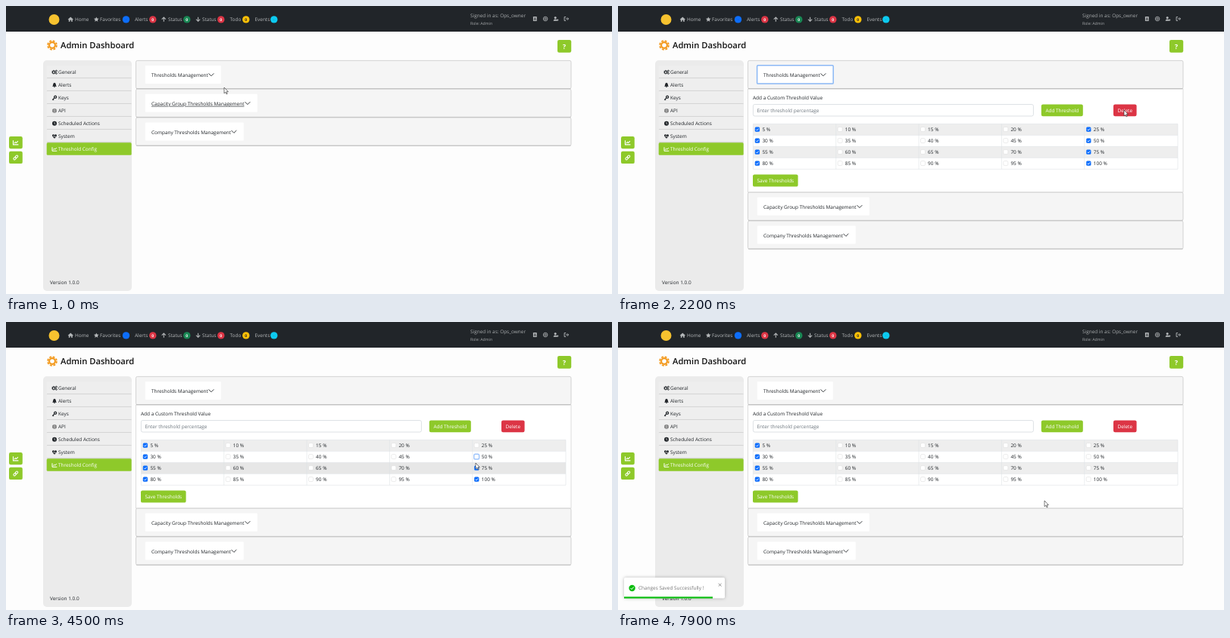
These frames come from a looping animation (800x382 px, 8 s). An HTML page:

```html
<!DOCTYPE html>
<html lang="en">
<head>
<meta charset="utf-8">
<title>Admin Dashboard</title>
<style>
html, body { margin: 0; width: 100%; height: 100%; overflow: hidden; background: #fdfdfd; }
svg { display: block; width: 800px; height: 382px; }
text { font: 6.45px "Open Sans", "Noto Sans", sans-serif; text-rendering: geometricPrecision; white-space: pre; }
</style>
</head>
<body>
<svg id="stage" viewBox="0 0 800 382"></svg>
<script>
const GREEN = '#8ec92a', RED = '#dc3545', INK = '#212529', BLUE = '#0d6efd';

const rect = (x, y, w, h, fill, more = '') =>
  `<rect x="${x}" y="${y}" width="${w}" height="${h}" fill="${fill}" ${more}/>`;
const disc = (x, y, r, fill, more = '') =>
  `<circle cx="${x}" cy="${y}" r="${r}" fill="${fill}" ${more}/>`;
const text = (x, y, s, fill = INK, style = '', more = '') =>
  `<text x="${x}" y="${y}" fill="${fill}" style="${style}" ${more}>${s}</text>`;
const centred = (x, y, s, fill, style) => text(x, y, s, fill, style, 'text-anchor="middle"');
const line = (d, stroke, w = 1, more = '') =>
  `<path d="${d}" fill="none" stroke="${stroke}" stroke-width="${w}" ${more}/>`;
const group = (id, body, more = '') => `<g id="${id}" ${more}>${body}</g>`;

// Icons are drawn around their own centre in a box of about 7 px.
const gear = c => disc(0, 0, 1.9, 'none', `stroke="${c}" stroke-width="1.3"`) +
  disc(0, 0, 2.8, 'none', `stroke="${c}" stroke-width="1" stroke-dasharray="1.1"`);
const icons = {
  home: c => `<path d="M-3.6 0L0-3.2 3.6 0 3 .6 2.5.2V3H.8V1H-.8V3H-2.5V.2L-3 .6Z" fill="${c}"/>`,
  star: c => `<path d="M0-3.3L1-1.1 3.3-.9 1.6.7 2.1 3 0 1.8-2.1 3-1.6.7-3.3-.9-1-1.1Z" fill="${c}"/>`,
  up: c => line('M0 3V-2.5M-2.6 0L0-2.6 2.6 0', c, 1.1),
  down: c => line('M0-3V2.5M-2.6 0L0 2.6 2.6 0', c, 1.1),
  book: c => rect(-2.4, -3, 4.8, 6, c, 'rx=".6"') + disc(0, -.9, .9, INK) + rect(-1.4, .5, 2.8, 1.1, INK),
  ring: c => disc(0, 0, 2.8, 'none', `stroke="${c}" stroke-width=".8"`) + disc(0, 0, 1.2, 'none', `stroke="${c}" stroke-width=".8"`),
  user: c => disc(-.7, -1.4, 1.5, c) + `<path d="M-3.3 2.8Q-3 .4-.7.4T1.9 2.8Z" fill="${c}"/>` + disc(2.3, 1.6, 1.1, c),
  exit: c => line('M-.6-2.5H-2.6V2.5H-.6M-1 0H2.8M1.2-1.7L2.9 0 1.2 1.7', c, .9),
  gears: c => `<g transform="translate(-1 0) scale(.85)">${gear(c)}</g>` + disc(2.5, -1.6, .9, 'none', `stroke="${c}" stroke-width=".9"`) + disc(2.5, 1.7, .9, 'none', `stroke="${c}" stroke-width=".9"`),
  bell: c => `<path d="M-2.9 1.9Q-1.9 1-1.9-.6 -1.7-2.6 0-3 1.7-2.6 1.9-.6 1.9 1 2.9 1.9Z" fill="${c}"/>` + disc(0, 2.5, .8, c),
  key: c => disc(1.1, -1.1, 1.5, 'none', `stroke="${c}" stroke-width="1.3"`) + line('M.1 0L-2.8 2.8M-2 2L-1 3', c, 1.2),
  globe: c => disc(0, 0, 2.9, '#666') + line('M-2.9 0H2.9M0-2.9V2.9M-1.8-2Q0-.6 1.8-2M-1.8 2Q0 .6 1.8 2', '#ddd', .5),
  clock: c => disc(0, 0, 3, c) + line('M0-1.8V.2L1.2 1', '#eee', .7),
  heart: c => `<path d="M0 3L-3 0Q-3.6-2.4-1.7-2.7-.5-2.7 0-1.7.5-2.7 1.7-2.7 3.6-2.4 3 0Z" fill="${c}"/>` + line('M-3.4.2H-1.2L-.5-1 .5 1.2 1.1.2H3.4', '#eee', .6),
  chart: c => line('M-3-2.6V2.4H3.3M-1.7.9L-.3-.7.8.3 2.8-1.9', c, 1),
  link: c => `<g transform="rotate(-45)">${rect(-3.6, -1.3, 3.9, 2.6, 'none', `rx="1.3" stroke="${c}"`)}${rect(-.3, -1.3, 3.9, 2.6, 'none', `rx="1.3" stroke="${c}"`)}</g>`
};
const icon = (name, x, y, c, k = 1) => `<g transform="translate(${x} ${y}) scale(${k})">${icons[name](c)}</g>`;

function header() {
  const c = '#b5b8ba';
  const badge = (x, fill, s, ink = '#fff') => disc(x, 17.9, 4.7, fill) + centred(x, 19.8, s, ink, 'font-size:5px;font-weight:700');
  const nav = [[91, 'Home'], [124, 'Favorites'], [170, 'Alerts'], [214, 'Status'], [259, 'Status'], [295.5, 'Todo'], [328.5, 'Events']];
  return rect(0, 0, 800, 34, INK) + disc(63.5, 18, 7, '#f6c22f') +
    nav.map(([x, s]) => text(x, 20, s, c)).join('') +
    icon('home', 85.3, 17.7, c) + icon('star', 119.3, 17.7, c) + icon('up', 208.3, 17.7, c) + icon('down', 253.6, 17.7, c) +
    badge(158.5, BLUE, '·', '#0a4db3') + badge(193.8, RED, '0') + badge(238.8, '#198754', '0') +
    badge(283.8, RED, '0') + badge(316.8, '#ffc107', '0', INK) + badge(353.8, '#0dcaf0', '·', '#078ba6') +
    text(613, 15, 'Signed in as: Ops_owner', '#a9acae') + text(613, 25, 'Role: Admin', '#a9acae', 'font-size:5.2px') +
    ['book', 'ring', 'user', 'exit'].map((n, i) => icon(n, 698.3 + i * 13.8, 17, c)).join('');
}

function sidebar() {
  const items = [['gears', 'General'], ['bell', 'Alerts'], ['key', 'Keys'], ['globe', 'API'],
    ['clock', 'Scheduled Actions'], ['heart', 'System'], ['chart', 'Threshold Config']];
  return rect(49, 72, 117, 306, '#ebebeb', 'rx="5"') + items.map(([n, s], i) => {
    const y = 79 + i * 17.03, on = i == 6, c = on ? '#fff' : INK;
    return rect(53.7, y, 112, 16.6, on ? GREEN : '#eee', 'rx="1.5"') +
      (on ? '' : line(`M54 ${y + 16.4}H165.5`, '#cfcfcf', .8)) +
      icon(n, 64, y + 8.7, c) + text(69, y + 11, s, c);
  }).join('') + text(58, 368.5, 'Version 1.0.0');
}

function card(y, w, label, id) {
  const end = 184 + w - 16.5;
  return rect(171.5, y, 574.5, 37.3, '#f5f5f5', 'rx="2" stroke="#cfcfcf" stroke-width=".9"') +
    line(`M172 ${y + 37.2}H745.5`, '#bbb', .9) +
    rect(183.8, y + 6.5, w, 24, '#fff', 'rx="1"') +
    text(192, y + 21.6, label, INK, '', `id="${id}"`) +
    line(`M${end} ${y + 17}l3.4 3.4 3.4-3.4`, INK, .9);
}

const button = (x, y, w, h, fill, s, id) => group(id,
  rect(x, y, w, h, fill, 'rx="2.2"') + centred(x + w / 2, y + h / 2 + 2.4, s, '#fff'));

function tableBody() {
  const colX = i => 178.4 + i * 109.35, rowY = i => 156.4 + i * 15;
  let s = '';
  for (let r = 0; r < 4; r++) s += rect(178.4, rowY(r), 560.6, 15, r % 2 ? '#fff' : '#eee', `id="row${r}"`);
  for (let r = 0; r < 5; r++) s += line(`M178.4 ${rowY(r)}H739`, '#dee2e6', .6);
  for (let c = 0; c < 6; c++) s += line(`M${c < 5 ? colX(c) : 739} 156.4V216.4`, '#dee2e6', .6);
  for (let r = 0; r < 4; r++) for (let c = 0; c < 5; c++) {
    const x = colX(c) + 2.4, y = rowY(r) + 4.2;
    s += rect(x, y, 6, 6, '#fff', 'rx="1.5" stroke="#d8d8d8" stroke-width=".5"');
    if (c == 4) s += rect(x - .4, y - .4, 6.8, 6.8, '#fff', `id="ring${r}" rx="1.8" stroke="#9cc3fb" stroke-width="1.4"`);
    if (c % 4 == 0) s += group(c ? 'tick' + r : 'fixed' + r, rect(x, y, 6.2, 6.2, BLUE, 'rx="1.5"') +
      line(`M${x + 1.5} ${y + 3.2}l1.2 1.2 2.2-2.5`, '#fff', .9));
    s += text(x + 9.6, rowY(r) + 9.9, (r * 5 + c + 1) * 5 + ' %');
  }
  return s;
}

function panel() {
  return rect(171.5, 110, 574.5, 137, '#fff', 'stroke="#d5d5d5" stroke-width=".8"') +
    text(178, 124.4, 'Add a Custom Threshold Value') +
    rect(178.4, 130.5, 370, 15.5, '#fff', 'rx="2.2" stroke="#ced4da" stroke-width=".7"') +
    text(183.5, 140.8, 'Enter threshold percentage', '#6c757d') +
    group('spin', '<path d="M538.8 137.6l1.5-2 1.5 2ZM538.8 138.9l1.5 2 1.5-2Z" fill="#999"/>') +
    button(558.8, 130.4, 55, 15.8, GREEN, 'Add Threshold', 'add') +
    button(654, 130.4, 30.6, 15.8, RED, 'Delete', 'del') +
    tableBody() + button(178, 223.4, 59.6, 16.2, GREEN, 'Save Thresholds', 'save');
}

const toast = () => rect(8, 339, 133, 27.6, '#fff', 'rx="1.8" style="filter:drop-shadow(0 .5px 2px #0004)"') +
  disc(18.6, 353, 4.2, '#07bc0c') + line('M16.5 353l1.5 1.6 2.8-3.2', '#fff', 1) +
  text(27, 355.4, 'Changes Saved Successfully !', '#757575', 'font:6.8px "Liberation Sans",Arial,sans-serif') +
  line('M132.7 346.8l3.8 3.8m0-3.8l-3.8 3.8', '#777', .8) +
  rect(8, 364.4, 133, 2.2, '#07bc0c', 'id="bar"');

document.getElementById('stage').innerHTML =
  '<clipPath id="fold"><rect id="foldBox" x="170" y="109" width="578" height="0"/></clipPath>' +
  rect(0, 0, 800, 382, '#fdfdfd') + header() +
  disc(61, 52, 3.9, 'none', 'stroke="#f39a1e" stroke-width="2.2"') +
  disc(61, 52, 5.9, 'none', 'stroke="#f39a1e" stroke-width="1.8" stroke-dasharray="2.9 1.73"') +
  text(72, 56, 'Admin Dashboard', '#111', 'font-size:11.2px;font-weight:600') +
  rect(728, 45, 18.2, 16.8, GREEN, 'rx="2.2"') + centred(737.1, 57, '?', '#fff', 'font-size:8.5px;font-weight:700') +
  rect(4, 173, 17.8, 16.3, GREEN, 'rx="2.2"') + icon('chart', 12.8, 181.2, '#fff', 1.1) +
  rect(4, 192.8, 17.8, 16.3, GREEN, 'rx="2.2"') + icon('link', 12.8, 201, '#fff') +
  sidebar() +
  group('panel', panel(), 'clip-path="url(#fold)"') +
  card(72.4, 100, 'Thresholds Management', 'first') +
  rect(183.6, 78.7, 100.6, 24.4, 'none', 'id="focus" rx="1.2" stroke="#8bb8f5" stroke-width="1.5"') +
  group('lower', card(110.2, 148, 'Capacity Group Thresholds Management', 'second') +
    card(148, 130, 'Company Thresholds Management', 'third')) +
  group('toast', toast()) +
  group('cursor', '<path d="M0 0V7.8L1.8 6.2 3 8.9 4.2 8.4 3 5.7H5.4Z" fill="#fff" stroke="#222" stroke-width=".6"/>');

const el = id => document.getElementById(id);
const show = (id, on) => el(id).style.display = on ? '' : 'none';
const clamp = v => Math.max(0, Math.min(1, v));
const ease = p => p * p * (3 - 2 * p);

// Value at time t along keys [time, ...values].
function along(keys, t, curve = ease) {
  let i = keys.findIndex(k => k[0] > t);
  if (i < 0) return keys[keys.length - 1].slice(1);
  if (i == 0) return keys[0].slice(1);
  const a = keys[i - 1], b = keys[i], p = curve((t - a[0]) / (b[0] - a[0]));
  return a.slice(1).map((v, j) => v + (b[j + 1] - v) * p);
}

const OPEN = 400, SAVE = 5650, TOAST = 5700;
const unticked = [3950, 4300, 4680, 4950];
const path = [[0, 288, 108], [300, 262, 92], [900, 262, 92], [1200, 400, 137], [1350, 480, 137], [1650, 586, 138],
  [1900, 590, 138], [2200, 668, 138], [2600, 591, 217], [3400, 591, 217], [3850, 620, 163], [3980, 620, 163],
  [4250, 620, 178], [4350, 620, 178], [4500, 620, 187], [4650, 620, 192], [4720, 620, 192], [4880, 620, 207],
  [5000, 620, 207], [5300, 590, 225], [5600, 215, 230], [6700, 215, 230], [7000, 293, 228], [7900, 563, 237]];
const bounce = [[0, -1320], [420, 11], [525, -4.4], [630, 2.2], [700, 0]];
const easeOut = p => 1 - (1 - p) ** 3;

function draw(t) {
  const [x, y] = along(path, t);
  const inside = (l, top, r, b) => x > l && x < r && y > top && y < b;
  const drop = 137 * ease(clamp((t - OPEN) / 350));
  el('foldBox').setAttribute('height', drop ? drop + 2 : 0);
  el('lower').setAttribute('transform', `translate(0 ${drop})`);
  el('second').style.textDecoration = t < 100 ? 'underline ' + BLUE : '';
  el('first').style.textDecoration = inside(184, 79, 284, 103) ? 'underline ' + BLUE : '';
  show('focus', t >= OPEN && t < unticked[0]);

  const typing = drop > 136 && inside(178, 130, 549, 146);
  show('spin', typing);
  show('cursor', !typing);
  el('cursor').setAttribute('transform', `translate(${x} ${y})`);

  const clicked = unticked.filter(u => t >= u).length;
  for (let r = 0; r < 4; r++) {
    const top = 156.4 + r * 15, hover = drop > 136 && inside(178, top, 739, top + 15);
    el('row' + r).setAttribute('fill', hover ? '#e7e7e7' : r % 2 ? '#fff' : '#eee');
    show('tick' + r, r >= clicked);
    show('ring' + r, r == clicked - 1 && t < SAVE);
  }

  const glow = clamp((t - 5500) / 150) * clamp((7080 - t) / 150);
  const mix = (a, b) => `rgb(${a.map((v, i) => v + (b[i] - v) * glow)})`;
  el('save').children[0].setAttribute('fill', mix([142, 201, 42], [164, 211, 85]));
  el('save').children[1].setAttribute('fill', glow ? mix([90, 120, 45], [33, 37, 41]) : '#fff');

  show('toast', t >= TOAST);
  el('toast').setAttribute('transform', `translate(${along(bounce, t - TOAST, easeOut)[0]} 0)`);
  el('bar').setAttribute('width', Math.min(133, 127 - (t - 7000) / 90));
}

function tick() {
  draw(Math.floor(performance.now() % 8000 / 100) * 100);
  requestAnimationFrame(tick);
}
tick();
</script>
</body>
</html>
```
